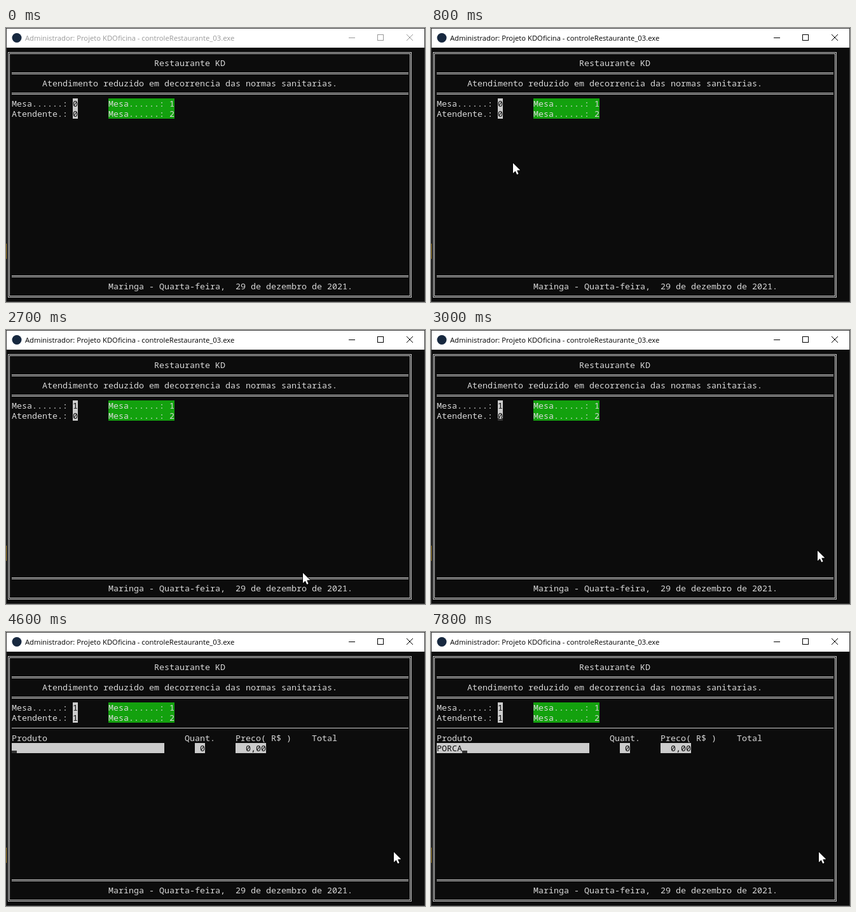
Write an HTML page with a canvas that moves like this. It is 659 by 432 pixels and loops after 8 s.

```html
<!DOCTYPE html>
<html lang="pt-BR">
<head>
<meta charset="utf-8">
<title>Console</title>
<style>
  html, body { margin: 0; width: 100%; height: 100%; overflow: hidden; background: #0c0c0c; }
  canvas { display: block; }
</style>
</head>
<body>
<canvas id="stage" width="659" height="432"></canvas>
<script>
const ctx = document.getElementById('stage').getContext('2d');
const LOOP = 8000, TICK = 100, BLINK = 480;
const CELL_W = 8, CELL_H = 16;
const LIGHT = '#cccccc', TEXT = '#d8d8d8', DARK = '#0c0c0c', GREEN = '#13a10e';
const ACTIVATE = 800, TABLE_TYPED = 2200, SECOND_FIELD = 2300, FORM_OPEN = 4600;
const colX = col => 1 + col * CELL_W;
const rowY = row => 31 + row * CELL_H;

function rect(x, y, w, h, color) {
  ctx.fillStyle = color;
  ctx.fillRect(x, y, w, h);
}

function write(text, col, row, color = TEXT) {
  ctx.font = '13.333px "Noto Sans Mono", monospace';
  ctx.fillStyle = color;
  [...text].forEach((ch, i) => ctx.fillText(ch, colX(col + i), rowY(row) + 13));
}

function field(text, col, row, back = LIGHT, color = DARK) {
  rect(colX(col), rowY(row), text.length * CELL_W, CELL_H, back);
  write(text, col, row, color);
}

function titleBar(active) {
  const color = active ? '#000000' : '#999999';
  rect(1, 1, 657, 30, '#ffffff');
  ctx.fillStyle = '#17283f';
  ctx.beginPath();
  ctx.arc(17, 15.5, 7.5, 0, 7);
  ctx.fill();

  ctx.font = '11.25px "Open Sans", sans-serif';
  ctx.fillStyle = color;
  ctx.fillText('Administrador: Projeto KDOficina - controleRestaurante_03.exe', 30, 20);

  rect(539, 15, 10, 1, color);
  ctx.strokeStyle = color;
  ctx.lineWidth = 1;
  ctx.strokeRect(584.5, 10.5, 9, 9);
  ctx.beginPath();
  ctx.moveTo(630, 10); ctx.lineTo(640, 20);
  ctx.moveTo(640, 10); ctx.lineTo(630, 20);
  ctx.stroke();
}

function frame() {
  rect(0, 0, 659, 432, '#3a3a3a');
  rect(0, 340, 1, 24, '#b8943a');
  rect(1, 31, 657, 400, DARK);
  ctx.strokeStyle = LIGHT;
  ctx.lineWidth = 1;
  for (const gap of [0, 2]) {
    ctx.strokeRect(3.5 + gap, 38.5 + gap, 634 - 2 * gap, 386 - 2 * gap);
    for (const row of [2, 4, 22]) rect(9, rowY(row) + 7 + gap, 624, 1, LIGHT);
  }
  write('Restaurante KD', 29, 1);
  write('Atendimento reduzido em decorrencia das normas sanitarias.', 7, 3);
  write('Maringa - Quarta-feira,  29 de dezembro de 2021.', 20, 23);
}

function orderForm(t) {
  write('Mesa......:', 1, 5);
  write('Atendente.:', 1, 6);
  field(t < TABLE_TYPED ? '0' : '1', 13, 5);
  field(t < FORM_OPEN ? '0' : '1', 13, 6);
  field('Mesa......: 1', 20, 5, GREEN, TEXT);
  field('Mesa......: 2', 20, 6, GREEN, TEXT);
}

function productForm(typed) {
  rect(9, 151, 624, 1, LIGHT);
  write('Produto', 1, 8);
  write('Quant.', 35, 8);
  write('Preco( R$ )', 45, 8);
  write('Total', 60, 8);
  field(typed.padEnd(30), 1, 9);
  field(' 0', 37, 9);
  field('  0,00', 45, 9);
}

// The blink restarts in each field; typing keeps the caret lit
function caret(t, letters) {
  const [col, row, start] =
    t < SECOND_FIELD ? [13, 5, ACTIVATE] :
    t < FORM_OPEN ? [13, 6, SECOND_FIELD] : [1 + letters, 9, FORM_OPEN + BLINK / 2];
  const lit = Math.floor((t - start) / BLINK) % 2 !== 0;
  if (t < ACTIVATE || !(lit || letters)) return;
  ctx.globalCompositeOperation = 'difference';
  rect(colX(col), rowY(row) + 12, CELL_W, 4, '#ffffff');
  ctx.globalCompositeOperation = 'source-over';
}

// Ease-out move along a line that sags by bow pixels
function glide(t, start, duration, [x0, y0], [x1, y1], bow) {
  const p = Math.min((t - start) / duration, 1);
  const s = 1 - (1 - p) ** 3;
  return [x0 + (x1 - x0) * s, y0 + (y1 - y0) * s + bow * Math.sin(Math.PI * s)];
}

function pointer(t) {
  const rest = [129, 213];
  if (t < 300 || (t >= SECOND_FIELD && t < 2500)) return;
  const [x, y] = (t < SECOND_FIELD
    ? glide(t, 300, 400, [634, 418], rest, 0)
    : glide(t, 2500, 600, rest, [610, 347], 95)).map(Math.round);
  const shape = [[0, 0], [0, 16], [3.7, 12.5], [6.2, 18], [8.6, 17], [6.2, 11.5], [11.3, 11.3]];
  ctx.beginPath();
  shape.forEach(([dx, dy]) => ctx.lineTo(x + dx, y + dy));
  ctx.closePath();
  ctx.strokeStyle = '#000000';
  ctx.lineWidth = 1.5;
  ctx.stroke();
  ctx.fillStyle = '#ffffff';
  ctx.fill();
}

function draw() {
  // The screen refreshes once per tick
  const t = Math.floor(performance.now() % LOOP / TICK) * TICK;
  const letters = Math.max(0, (t - 7300) / TICK);
  const typed = 'PORCA'.slice(0, letters);
  frame();
  titleBar(t >= ACTIVATE);
  orderForm(t);
  if (t >= FORM_OPEN) productForm(typed);
  caret(t, typed.length);
  pointer(t);
  requestAnimationFrame(draw);
}
draw();
</script>
</body>
</html>
```
